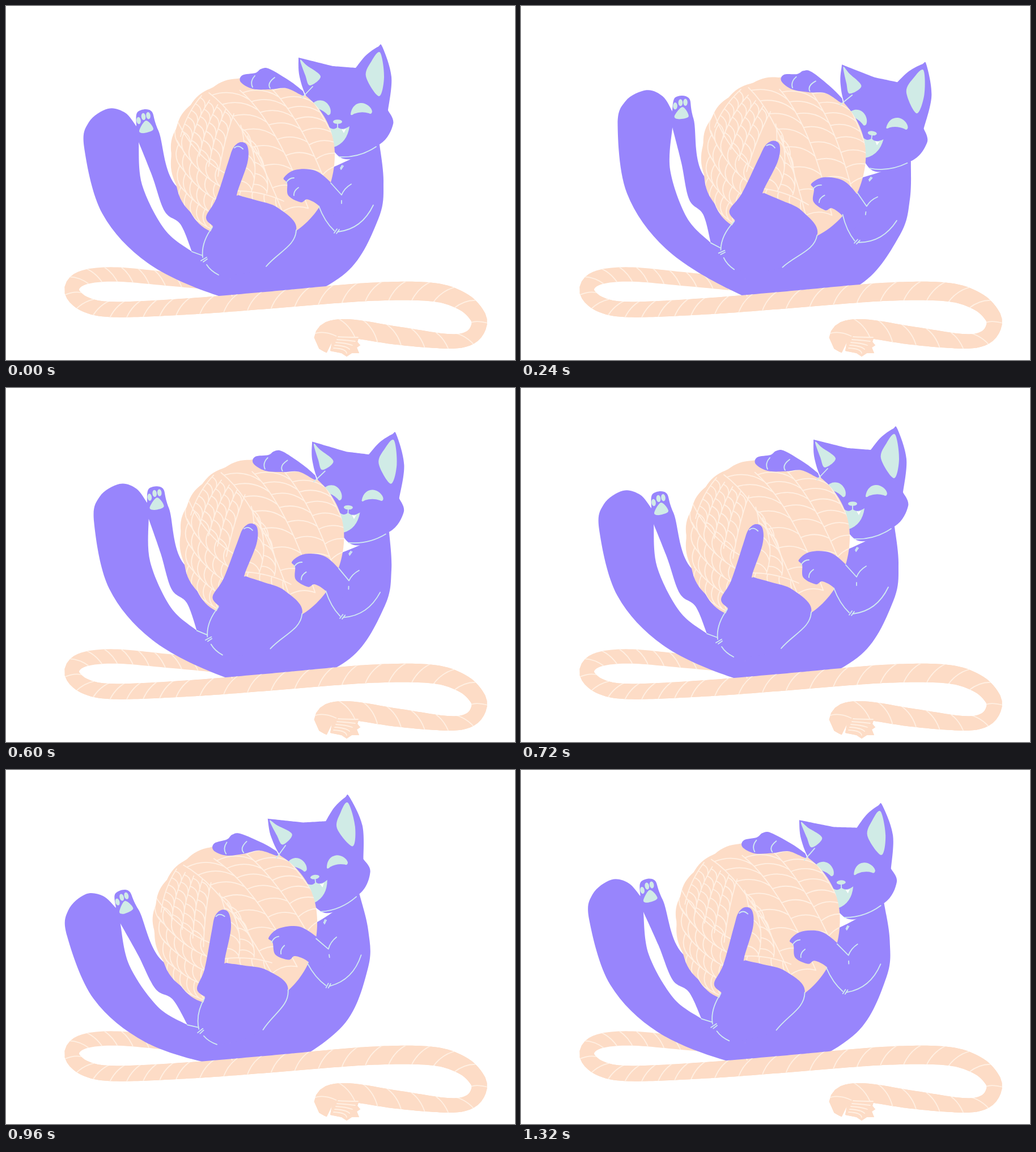
An HTML page for the animation above (1440 ms loop, 898 px wide and 624 px high).

```html
<!DOCTYPE html>
<html lang="en">
<head>
<meta charset="utf-8">
<title>Cat with yarn</title>
<style>
html, body { margin: 0; width: 100%; height: 100%; overflow: hidden; background: #fff; }
svg { display: block; width: 898px; height: 624px; }
.fur { fill: #9885fc; }
.mint { fill: #d0ebe6; }
.yarn { fill: #fddcc6; }
.gap { fill: #fff; }
.line, .twist { fill: none; stroke-width: 1.8; stroke-linecap: round; stroke-linejoin: round; }
.line { stroke: #d0ebf0; }
.twist { stroke: #fff0e3; }
</style>
</head>
<body>
<svg viewBox="0 0 898 624">
  <defs>
    <clipPath id="ropeClip"></clipPath>
    <clipPath id="ballClip"></clipPath>
    <clipPath id="frontClip"><path d="M0 505H395V470H898V624H0z"/></clipPath>
  </defs>
  <g id="rope"></g>
  <g id="cat"></g>
  <use href="#rope" clip-path="url(#frontClip)"/>
</svg>
<script>
const $ = id => document.getElementById(id);
const cat = $('cat'), rope = $('rope');
const { sin, cos, abs, min, exp, PI } = Math;

function add(parent, cls, d, tag = 'path') {
  const el = document.createElementNS('http://www.w3.org/2000/svg', tag);
  el.setAttribute('class', cls);
  if (d) el.setAttribute('d', d);
  parent.append(el);
  return el;
}

function clipped(parent, clip) {
  const g = add(parent, '', '', 'g');
  g.setAttribute('clip-path', `url(#${clip})`);
  return g;
}

// Smooth curve through the points; a repeated point makes a corner.
function smooth(text, closed) {
  const p = text.trim().split(/\s+/).map(s => s.split(',').map(Number));
  const n = p.length;
  const at = i => closed ? p[(i + n) % n] : p[Math.max(0, min(n - 1, i))];
  let d = 'M' + p[0];
  for (let i = 0; i < (closed ? n : n - 1); i++) {
    const [a, b, c, e] = [-1, 0, 1, 2].map(k => at(i + k));
    if (b[0] === c[0] && b[1] === c[1]) continue;
    const c1 = b.map((v, k) => v + (c[k] - a[k]) / 6);
    const c2 = c.map((v, k) => v - (e[k] - b[k]) / 6);
    d += `C${c1} ${c2} ${c}`;
  }
  return d + (closed ? 'z' : '');
}
const blob = (cls, pts, parent = cat) => add(parent, cls, smooth(pts, true));

function place(el, x, y, turn) {
  el.setAttribute('transform', `translate(${x} ${y}) rotate(${turn})`);
}
const oval = (x, y, rx, ry, turn = 0) =>
  place(add(cat, 'mint', `M${-rx} 0a${rx} ${ry} 0 1 1 ${2 * rx} 0a${rx} ${ry} 0 1 1 ${-2 * rx} 0z`), x, y, turn);
const eye = (x, y, turn) =>
  place(add(cat, 'mint', 'M-19 9C-17-6-8-11 0-11S18-4 19 4Q18 10 13 7 0 3-13 8-18 12-19 9z'), x, y, turn);

function drawRope() {
  const mid = add(rope, 'twist', smooth(`395,492 285,481 190,473 133,480 116,502 140,526 195,535
    330,529 470,518 640,504 750,504 804,520 831,545 834,565 818,585 780,591 690,581 610,569 571,572
    560,588 574,597`));
  const total = mid.getTotalLength();
  const spot = s => {
    const a = mid.getPointAtLength(s - 1), b = mid.getPointAtLength(s + 1);
    const len = Math.hypot(b.x - a.x, b.y - a.y);
    return { x: (a.x + b.x) / 2, y: (a.y + b.y) / 2, tx: (b.x - a.x) / len, ty: (b.y - a.y) / len };
  };
  // thickens along its length, squeezed where it turns back
  const half = u => min(33, 23 + 15 * u) / 2 - 4 * exp(-(((u - .8) / .06) ** 2));

  const sides = [[], []];
  for (let s = 1; s < total; s += 6) {
    const { x, y, tx, ty } = spot(s), w = half(s / total);
    sides[0].push([x + ty * w, y - tx * w]);
    sides[1].unshift([x - ty * w, y + tx * w]);
  }
  const outline = 'M' + sides.flat().join('L') + 'z';
  add(rope, 'yarn', outline);
  add($('ropeClip'), '', outline);

  const g = clipped(rope, 'ropeClip');
  for (let s = 12; s < total; s += s < 480 ? 29 : 42) {
    const { x, y, tx, ty } = spot(s), up = tx < 0 ? -19 : 19, lead = 18 * abs(tx);
    const dot = (n, t) => `${x + ty * up * n + tx * t} ${y - tx * up * n + ty * t}`;
    add(g, 'twist', `M${dot(-1, -lead)}Q${dot(.4, -7)} ${dot(1, lead)}`);
  }
  mid.remove();

  add(rope, 'yarn', 'M576 586L600 583 622 586 620 592 625 598 619 602 623 612 610 612 601 618 592 612 572 608z');
  for (let i = 0; i < 5; i++)
    add(rope, 'twist', `M${586 - 2 * i} ${583 + 5 * i}Q600 ${584 + 5 * i} ${621 - 5 * i} ${584 + 7 * i}`);
}

// A fan of strands spread evenly between two quadratic curves, crossed by arcs.
function fan(parent, first, last, rows, arcs, skew, bow) {
  const on = (r, t) => {
    const q = first.map((v, i) => v + (last[i] - v) * r / rows);
    return [0, 1].map(k => (1 - t) ** 2 * q[k] + 2 * t * (1 - t) * q[k + 2] + t * t * q[k + 4]);
  };
  const steps = [...Array(13).keys()];
  let d = '';
  for (let r = 0; r <= rows; r++) {
    d += 'M' + steps.map(i => on(r, i / 12)).join('L');
    for (let k = 0; k < arcs && r < rows; k++) {
      const t = (k + .3) / arcs, a = on(r, t), b = on(r + 1, min(1, t + skew));
      const cx = (a[0] + b[0]) / 2 + (b[1] - a[1]) * bow;
      const cy = (a[1] + b[1]) / 2 - (b[0] - a[0]) * bow;
      d += `M${a}Q${cx} ${cy} ${b}`;
    }
  }
  add(parent, 'twist', d);
}

function drawBall() {
  const edge = [];
  for (let a = 0; a < 2 * PI; a += .04) {
    const bump = cos(a) < 0 ? 2.5 * abs(sin(a * 9)) : 0;
    edge.push([436 + (144 + bump) * cos(a), 262 + ((sin(a) > 0 ? 158 : 136) + bump) * sin(a)]);
  }
  const d = 'M' + edge.join('L') + 'z';
  add(cat, 'yarn', d);
  add($('ballClip'), '', d);
  const g = clipped(cat, 'ballClip');
  fan(g, [358, 153, 430, 205, 500, 395], [522, 140, 565, 195, 600, 280], 3, 8, .1, .24);
  fan(g, [345, 158, 318, 190, 308, 230], [402, 190, 385, 235, 374, 300], 4, 6, .14, .4);
  fan(g, [300, 198, 330, 262, 385, 294], [308, 355, 335, 380, 368, 396], 4, 6, .08, -.35);
  fan(g, [414, 210, 430, 260, 405, 326], [438, 248, 468, 300, 460, 330], 2, 5, .1, .3);
  fan(g, [408, 326, 450, 326, 490, 344], [400, 342, 450, 345, 502, 378], 1, 4, .08, -.3);
}

function drawHead() {
  blob('fur', `516,91 516,91 577,106 577,106 617,109 617,109 635,87 656,72 664,72 680,125 674,184
    674,184 683,208 659,244 590,267 535,170 518,125`);
  blob('mint', '519,95 531,105 555,124 536,140 528,122');
  blob('mint', '660,82 667,125 658,159 635,124 645,97');
  eye(557, 178, 26);
  eye(627, 182, 0);
  oval(585, 204, 8, 3.8);
  add(cat, 'mint', 'M568 212Q578 221 585 213 592 221 606 212 602 241 578 249z');
  add(cat, 'gap', 'M592 217Q597 219 600 216L596 224z');
  add(cat, 'line', 'M585 206V213M588 266Q623 268 653 248M590 286L593 281M591 288L595 282');
}

function drawBody() {
  blob('fur', `180,181 146,205 138,250 170,366 250,453 372,510 478,528 600,470 657,375 666,310
    659,244 659,244 530,300 320,330 269,220 256,185 232,187 230,212 230,212 210,188`);
  blob('gap', '234,240 234,240 240,315 280,394 328,433 328,433 308,385 280,362 258,300');
  blob('mint', '235,220 247,202 260,217 244,224');
  for (let i = 0; i < 3; i++) oval(234 + 8.5 * i, 202 - 9 * sin(i * .9), 3.8, 6.2, -8);
}

function drawPaws() {
  blob('fur', `414,134 417,122 440,118 450,111 465,111 502,133 524,150 524,150 524,158 495,145
    466,147 435,146`);
  add(cat, 'line', 'M439 123Q430 133 435 143M474 126Q460 136 466 145M541 142L522 162');

  const hand = add(cat, '', '', 'g');
  blob('fur', `490,303 510,289 545,290 573,311 593,335 570,378 553,353 532,341 520,346 498,334
    496,312`, hand);
  add(hand, 'line', 'M494 312Q499 303 508 303M508 334Q507 326 516 320');
  add(cat, 'line', `M573 312L592 333Q597 321 609 314M592 343V348M579 400L584 393M583 401L588 394
    M552 353Q562 380 579 396M586 398Q628 393 648 351`);

  blob('fur', `392,275 401,250 414,240 426,247 426,276 408,329 412,334 440,342 480,356 512,395
    459,459 375,474 347,443 365,388 365,388 353,372 371,339`);
  add(cat, 'line', `M403 250Q410 244 418 252M512 395C511 423 480 434 459 459M364 390Q344 417 347 443
    M328 433L347 440M344 449L354 443M348 451L355 446M354 456Q361 467 375 474`);
  return hand;
}

drawRope();
drawBody();
drawHead();
drawBall();
const hand = drawPaws();

// Rocks to and fro in twelve held poses.
function frame(now) {
  const turn = Math.floor(now / 120) % 12 * PI / 6;
  const s = sin(turn);
  const lean = 8.7 * s - 1.75 * sin(3 * turn);
  const shift = 32 * s * cos(turn) ** 6 - 2 * s * s;
  cat.setAttribute('transform', `translate(${shift} 0) rotate(${lean} 449 486)`);
  hand.setAttribute('transform', `translate(0 ${lean * .45})`);
  requestAnimationFrame(frame);
}
frame(0);
</script>
</body>
</html>
```
